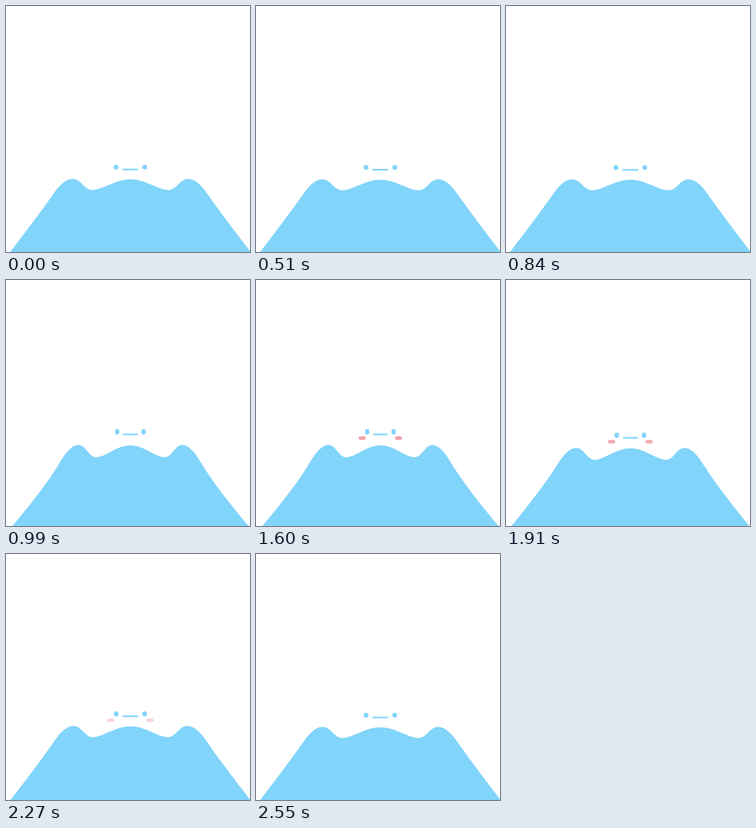
An HTML page with a canvas for the animation above (3.03 s loop, 306 px wide and 308 px high).

```html
<!DOCTYPE html>
<html lang="en">
<head>
<meta charset="utf-8">
<title>Bouncing blob</title>
<style>
html, body { margin: 0; width: 100%; height: 100%; overflow: hidden; background: #fff; }
canvas { display: block; width: 306px; height: 308px; }
</style>
</head>
<body>
<canvas id="stage" width="306" height="308"></canvas>
<script>
const ctx = document.getElementById('stage').getContext('2d');
const W = 306, H = 308, CX = 156;
const LOOP = 3030, STEP = 30, REST = 0.56;
const BLUE = '#81d4fa', PINK = '#f0a5a8';

const mix = (a, b, k) => a + (b - a) * k;
const inOut = p => (1 - Math.cos(Math.PI * p)) / 2;
const out = p => Math.sin(p * Math.PI / 2);

// Progress of a stepped move whose first change falls on `start`.
function phase(t, start, end) {
  if (t < start) return 0;
  const done = Math.floor((t - start) / STEP) * STEP + STEP;
  return t >= end ? 1 : Math.min(1, done / (end - start + STEP));
}

// 0 is tall, 1 is flat.
function squash(t) {
  if (t < 750) return mix(REST, 1, inOut(phase(t, 510, 720)));
  if (t < 1730) return 1 - inOut(phase(t, 750, 990));
  return REST * out(phase(t, 1730, 2550));
}

function blush(t) {
  if (t < 1730) return phase(t, 1120, 1600);
  return Math.cos(phase(t, 1730, 2550) * Math.PI / 2);
}

// Curve between two level points; h1 and h2 are handle lengths as parts of the gap.
function wave(a, b, h1, h2) {
  const gap = b.x - a.x;
  ctx.bezierCurveTo(a.x + gap * h1, a.y, b.x - gap * h2, b.y, b.x, b.y);
}

// One half of the body, from the middle crest out to the foot.
function drawHalf(k, side) {
  const at = (tallX, tallY, flatX, flatY) =>
    ({ x: CX + side * mix(tallX, flatX, k), y: mix(tallY, flatY, k) });
  const crest = at(0, 207, 0, 225);
  const dip = at(43, 222, 51.5, 237);
  const peak = at(65, 206.5, 78, 224.5);
  const shoulder = at(90, 231, 103, 240.5);
  const bend = at(106, 258, 123, 266);
  const foot = at(148, H, 153, H);

  ctx.beginPath();
  ctx.moveTo(CX, H);
  ctx.lineTo(crest.x, crest.y);
  wave(crest, dip, 0.4, 0.27);
  wave(dip, peak, 0.42, 0.42);
  ctx.bezierCurveTo(
    mix(peak.x, shoulder.x, 0.42), peak.y,
    mix(shoulder.x, bend.x, -0.33), mix(shoulder.y, bend.y, -0.33),
    shoulder.x, shoulder.y);
  ctx.quadraticCurveTo(bend.x, bend.y, foot.x, foot.y);
  ctx.fill();
}

function drawPair(gap, y, rx, ry) {
  for (const side of [-1, 1]) {
    ctx.beginPath();
    ctx.ellipse(CX + side * gap, y, rx, ry, 0, 0, Math.PI * 2);
    ctx.fill();
  }
}

function drawFace(k, alpha) {
  drawPair(mix(16.5, 19.2, k), mix(190, 211, k), mix(2.7, 3.2, k), mix(3.5, 2.7, k));

  const half = mix(9, 10.5, k), thick = 2;
  ctx.fillRect(CX - half, mix(193.3, 213.6, k) - thick / 2, half * 2, thick);

  ctx.globalAlpha = alpha;
  ctx.fillStyle = PINK;
  drawPair(mix(22.7, 26.7, k), mix(198, 219, k), mix(4.6, 5.1, k), mix(2.5, 1.7, k));
  ctx.globalAlpha = 1;
}

function frame(now) {
  const t = now % LOOP, k = squash(t);
  ctx.fillStyle = '#fff';
  ctx.fillRect(0, 0, W, H);
  ctx.fillStyle = BLUE;
  drawHalf(k, -1);
  drawHalf(k, 1);
  drawFace(k, blush(t));
}

const begin = performance.now();
function tick() {
  frame(performance.now() - begin);
  requestAnimationFrame(tick);
}
tick();
</script>
</body>
</html>
```
